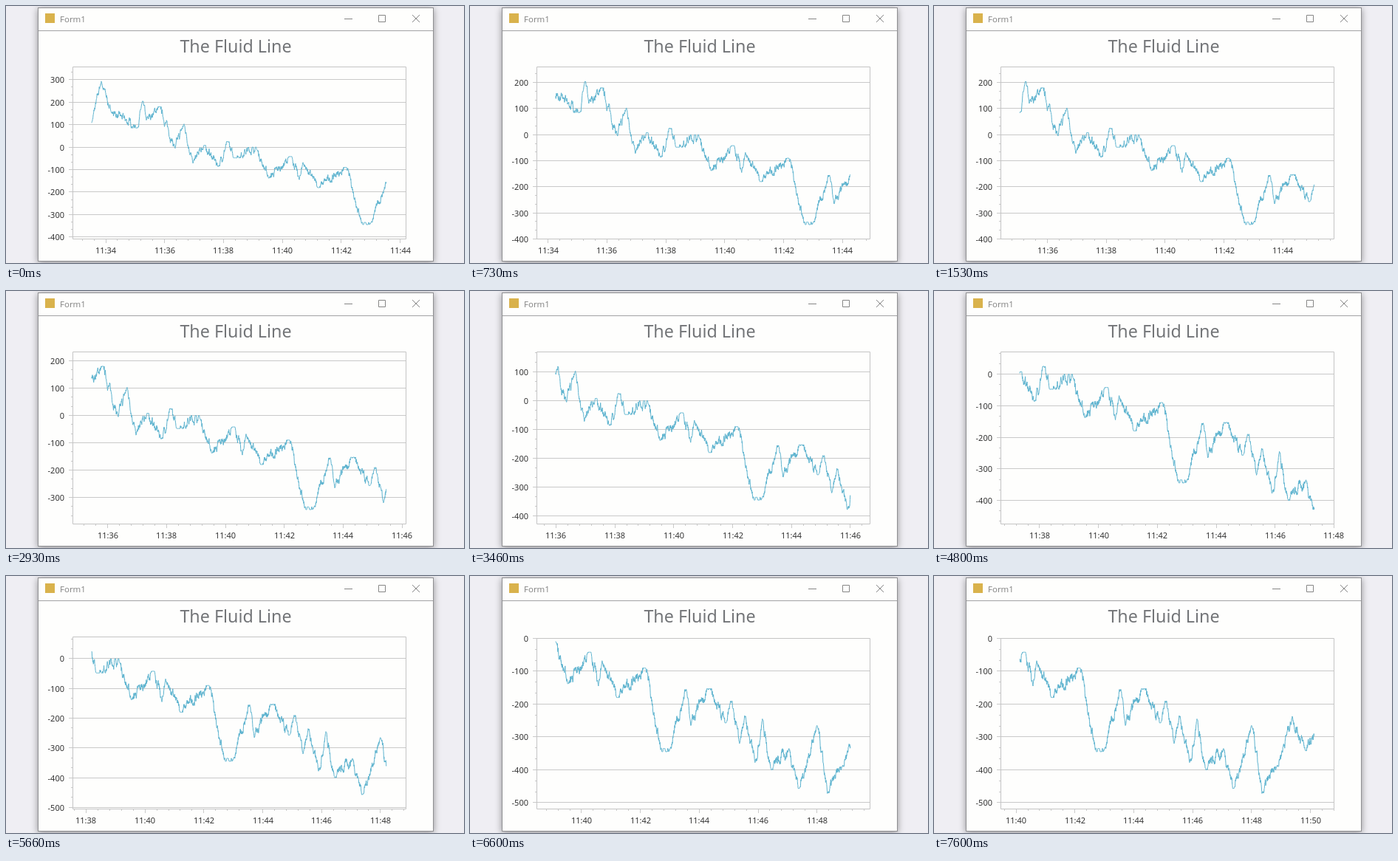
These frames come from a looping animation (620x348 px, 7660 ms). An HTML page with a canvas:

```html
<!DOCTYPE html>
<html>
<head>
<meta charset="utf-8">
<style>
  html, body { margin: 0; width: 620px; height: 348px; overflow: hidden; }
  canvas { display: block; }
</style>
</head>
<body>
<canvas id="stage" width="620" height="348"></canvas>
<script>
const ctx = document.getElementById('stage').getContext('2d');
const LOOP = 7660, STEP = 200 / 3;
const PAUSE_AT = 1930, PAUSE = 1000;
const PX_PER_MIN = 39.85, WINDOW = 399;
const LEFT = 90, RIGHT = 541, BOTTOM = 315, DATA_LEFT = 116;
const SAMPLES_PER_PX = 4;

// Turning points of the signal: [distance in px, value]
const turns = [
  [0, 108], [13, 293], [26, 160], [62, 85], [69, 205], [74, 120], [92, 180], [113, -5],
  [125, 103], [137, -72], [152, 8], [172, -86], [184, 25], [192, -48], [222, 0], [240, -138],
  [271, -42], [281, -145], [286, -68], [306, -180], [345, -90], [367, -345], [378, -335],
  [400, -155], [406, -265], [430, -153], [454, -257], [460, -190], [472, -320], [479, -235],
  [493, -378], [503, -245], [515, -400], [539, -335], [553, -457], [577, -265], [591, -472],
  [611, -390], [632, -237], [650, -342], [664, -290]
];

let seed = 7;
function random() {
  seed = (seed * 16807) % 2147483647;
  return seed / 2147483647;
}

// Noisy path from turn to turn that never leaves the range of its two ends
const data = [];
let noise = 0;
turns.slice(1).forEach(([x1, y1], k) => {
  const [x0, y0] = turns[k];
  const count = (x1 - x0) * SAMPLES_PER_PX;
  for (let i = 0; i < count; i++) {
    noise = noise * 0.85 + (random() - 0.5) * 20;
    const fade = Math.min(1, Math.min(i, count - i) / SAMPLES_PER_PX / 2);
    const value = y0 + (y1 - y0) * i / count + noise * fade;
    data.push(Math.max(Math.min(y0, y1), Math.min(Math.max(y0, y1), value)));
  }
});

function rect(x, y, w, h, color) {
  ctx.fillStyle = color;
  ctx.fillRect(x, y, w, h);
}

function text(str, x, y, font, color, align) {
  ctx.font = font;
  ctx.fillStyle = color;
  ctx.textAlign = align;
  ctx.fillText(str, x, y);
}

function stroke(color, build) {
  ctx.strokeStyle = color;
  ctx.lineWidth = 1;
  ctx.beginPath();
  build();
  ctx.stroke();
}

function drawWindow() {
  rect(0, 0, 620, 348, '#efeef3');
  ctx.save();
  ctx.shadowColor = 'rgba(0,0,0,.4)';
  ctx.shadowBlur = 9;
  ctx.shadowOffsetY = 2;
  rect(43, 2, 536, 344, '#8f8f92');
  ctx.restore();
  rect(44, 3, 534, 342, '#fefefd');
  rect(44, 33, 534, 1, '#a2a2a4');
  rect(53, 10, 13, 13, '#d9b24c');
  text('Form1', 73, 22, '11.5px "Open Sans", sans-serif', '#808080', 'left');
  stroke('#858585', () => {
    ctx.moveTo(458, 17.5); ctx.lineTo(469, 17.5);
    ctx.rect(504.5, 12.5, 9, 9);
    ctx.moveTo(550, 12); ctx.lineTo(560, 22);
    ctx.moveTo(560, 12); ctx.lineTo(550, 22);
  });
  text('The Fluid Line', 311, 63, '23.3px "Noto Sans", sans-serif', '#737578', 'center');
}

function drawChart(scroll) {
  const first = Math.round(scroll * SAMPLES_PER_PX);
  const visible = data.slice(first, first + WINDOW * SAMPLES_PER_PX);
  const max = Math.max(0, ...visible), min = Math.min(0, ...visible);
  const margin = (max - min) * 0.1;
  const high = max > 0 ? max + margin : 0, low = min - margin;
  const top = max > 0 ? 82 : 84;
  const toY = v => top + 0.5 + (high - v) / (high - low) * (BOTTOM - top);
  const font = '11px "Noto Sans", sans-serif', ink = '#333', grid = '#c9c9c9';

  for (let i = Math.ceil(low / 100 * 3); i <= high / 100 * 3; i++) {
    const y = Math.floor(toY(i * 100 / 3));
    if (i % 3) {
      rect(LEFT - 2, y, 2, 1, grid);
    } else {
      rect(LEFT - 5, y, RIGHT - LEFT + 5, 1, grid);
      text(String(i / 3 * 100), 79, y + 4.5, font, ink, 'right');
    }
  }

  // Minor ticks every 24 s, labels every 2 min
  for (let i = 0; i < 50; i++) {
    const minute = 32 + i * 0.4;
    const x = 135 + (minute - 34) * PX_PER_MIN - scroll;
    if (x < LEFT || x > RIGHT + 1) continue;
    const major = i % 5 === 0;
    rect(Math.floor(x), BOTTOM, 1, major ? 6 : 3, grid);
    if (major) text('11:' + Math.round(minute), Math.round(x), 335, font, ink, 'center');
  }

  stroke('#c4c4c4', () => ctx.rect(LEFT + 0.5, top + 0.5, RIGHT - LEFT, BOTTOM - top));
  ctx.lineJoin = 'bevel';
  stroke('#5cb3cf', () => visible.forEach((v, i) => {
    ctx.lineTo(DATA_LEFT + (first + i) / SAMPLES_PER_PX - scroll, toY(v));
  }));
}

function frame() {
  const t = performance.now() % LOOP;
  const active = t < PAUSE_AT + PAUSE ? Math.min(t, PAUSE_AT) : t - PAUSE;
  const step = Math.floor((active + 7) / STEP);
  drawWindow();
  drawChart(step * STEP / 1000 * PX_PER_MIN);
  requestAnimationFrame(frame);
}
frame();
</script>
</body>
</html>
```
